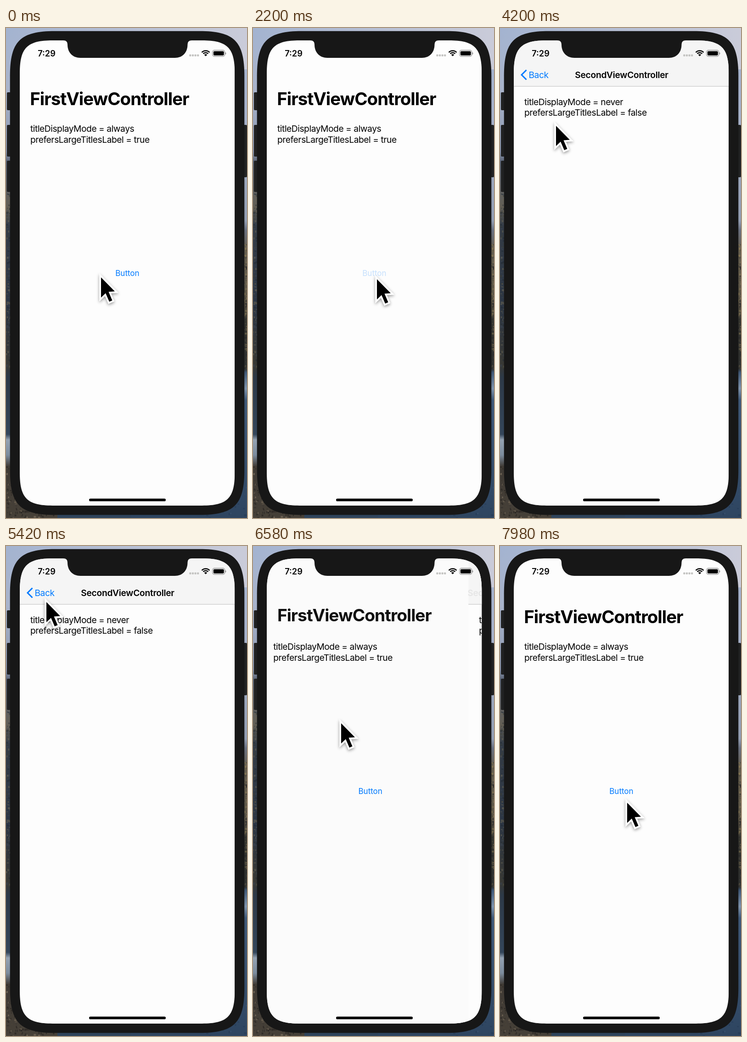
An HTML page with a canvas that plays this animation: 525 px wide and 1067 px high, repeating every 8000 ms.

```html
<!DOCTYPE html>
<html lang="en">
<head>
<meta charset="utf-8">
<title>Large title navigation</title>
<style>
html, body { margin: 0; width: 100%; height: 100%; overflow: hidden; background: #171717; }
canvas { display: block; width: 525px; height: 1067px; }
</style>
</head>
<body>
<canvas id="stage"></canvas>
<script>
const W = 525, H = 1067, LOOP = 8000;
const SCREEN = { x: 30, y: 27, w: 468.3, h: 1013, r: 51 };
const BAR_BOTTOM = 127;
const BLUE = '#007aff', BODY = '#171717';
const FAMILY = 'Inter, "Liberation Sans", sans-serif';
const PUSH = 2280, POP = 6260, SLIDE = 520;
const PRESS = 1500, RELEASE = 2240;

const dpr = window.devicePixelRatio || 1;
const canvas = document.getElementById('stage');
const ctx = canvas.getContext('2d');
canvas.width = W * dpr;
canvas.height = H * dpr;

const clamp = v => Math.max(0, Math.min(1, v));

function seeded(seed) {
  return () => {
    seed = (seed * 16807) % 2147483647;
    return seed / 2147483647;
  };
}

function roundRect(g, x, y, w, h, r, fill) {
  g.beginPath();
  g.roundRect(x, y, w, h, r);
  g.fillStyle = fill;
  g.fill();
}

// Rectangle whose corners ease into the straight sides
function smoothRect(g, x, y, w, h, r) {
  const e = 1.4 * r, c = 0.315 * r, x2 = x + w, y2 = y + h;
  g.beginPath();
  g.moveTo(x + e, y);
  g.lineTo(x2 - e, y);
  g.bezierCurveTo(x2 - c, y, x2, y + c, x2, y + e);
  g.lineTo(x2, y2 - e);
  g.bezierCurveTo(x2, y2 - c, x2 - c, y2, x2 - e, y2);
  g.lineTo(x + e, y2);
  g.bezierCurveTo(x + c, y2, x, y2 - c, x, y2 - e);
  g.lineTo(x, y + e);
  g.bezierCurveTo(x, y + c, x + c, y, x + e, y);
  g.closePath();
}

function shade(g, x, y, w, h, stops) {
  const grad = g.createLinearGradient(0, y, 0, y + h);
  for (const [at, color] of stops) grad.addColorStop((at - y) / h, color);
  g.fillStyle = grad;
  g.fillRect(x, y, w, h);
}

// Coast behind the device, and the device body itself
function makeBackdrop() {
  const layer = document.createElement('canvas');
  layer.width = W * dpr;
  layer.height = H * dpr;
  const g = layer.getContext('2d');
  g.scale(dpr, dpr);

  shade(g, 0, 0, 262, H, [[0, '#a3b3d0'], [130, '#a9b4cb'], [270, '#8c98b0'], [290, '#5c6577'],
    [390, '#625e54'], [430, '#343c46'], [600, '#2c3644'], [735, '#383834'], [760, '#2d3947'],
    [885, '#34465a'], [897, '#94a2b2'], [930, '#7c8c9d'], [955, '#3f3a34'], [H, '#464038']]);
  shade(g, 262, 0, 263, H, [[0, '#a3b3d0'], [200, '#a6b1c9'], [420, '#929db2'], [440, '#697080'],
    [480, '#665f50'], [600, '#5a5344'], [640, '#34342f'], [742, '#2e302f'], [750, '#3f5877'],
    [785, '#7e93ac'], [810, '#3e5878'], [H, '#2e4560']]);
  const haze = g.createLinearGradient(0, 0, W, 0);
  haze.addColorStop(0, 'rgba(206,206,218,0)');
  haze.addColorStop(1, 'rgba(206,206,218,0.9)');
  g.fillStyle = haze;
  g.fillRect(0, 0, W, 90);
  g.fillStyle = '#2f445b';
  g.fillRect(112, 1050, 160, 17);

  const rand = seeded(71);
  const grain = (n, x, y, w, h, colors) => {
    for (let i = 0; i < n; i++) {
      g.fillStyle = colors[Math.floor(rand() * colors.length)];
      g.fillRect(x + rand() * w, y + rand() * h, 1 + rand() * 4, 1 + rand() * 4);
    }
  };
  g.globalAlpha = 0.55;
  grain(180, 0, 360, 9, 380, ['#222a33', '#6a6452', '#3b4450', '#3e4038']);
  grain(420, 0, 955, 112, 112, ['#1f1d1b', '#8c7f6a', '#4a4238', '#2a2724']);
  grain(120, 518, 470, 7, 270, ['#28292a', '#8a7a55', '#4a463c']);
  grain(60, 400, 960, 125, 107, ['#243a54', '#3d5674']);
  g.globalAlpha = 1;

  for (const [x, y, w, h] of [[2, 140, 12, 39], [2, 211, 12, 69], [2, 289, 12, 68], [514, 211, 11, 114]])
    roundRect(g, x, y, w, h, 2, '#202122');
  smoothRect(g, 8.7, 6.7, 510.6, 1053.6, 70);
  g.fillStyle = BODY;
  g.fill();
  return layer;
}

function text(str, x, y, size, o = {}) {
  ctx.font = `${o.weight || 400} ${size}px ${FAMILY}`;
  ctx.letterSpacing = `${(o.track || 0) * size}px`;
  ctx.textAlign = o.align || 'left';
  ctx.fillStyle = o.color || '#000';
  ctx.fillText(str, x, y);
}

function faded(alpha, draw) {
  if (alpha <= 0) return;
  ctx.save();
  ctx.globalAlpha = alpha;
  draw();
  ctx.restore();
}

function shifted(dx, draw) {
  ctx.save();
  ctx.translate(dx, 0);
  draw();
  ctx.restore();
}

function page() {
  ctx.fillStyle = '#fdfdfd';
  ctx.fillRect(SCREEN.x, SCREEN.y, SCREEN.w, SCREEN.h);
}

function lines(y, mode, large) {
  text('titleDisplayMode = ' + mode, 53, y, 19.2, { track: -0.023 });
  text('prefersLargeTitlesLabel = ' + large, 53, y + 23.3, 19.2, { track: -0.023 });
}

function firstPage(buttonAlpha) {
  page();
  lines(226.3, 'always', true);
  faded(buttonAlpha, () => text('Button', 264.4, 540, 17, { color: BLUE, align: 'center' }));
}

function secondPage() {
  page();
  lines(167.5, 'never', false);
}

function barBack() {
  ctx.fillStyle = '#f5f5f5';
  ctx.fillRect(SCREEN.x, SCREEN.y, SCREEN.w, BAR_BOTTOM - SCREEN.y);
  ctx.fillStyle = '#bcbcbc';
  ctx.fillRect(SCREEN.x, BAR_BOTTOM - 0.5, SCREEN.w, 1);
}

function barTitle(dx, alpha) {
  faded(alpha, () => text('SecondViewController', 265 + dx, 108.7, 19.2,
    { weight: 600, track: -0.014, align: 'center' }));
}

function backButton(alpha) {
  faded(alpha, () => {
    ctx.strokeStyle = BLUE;
    ctx.lineWidth = 3;
    ctx.beginPath();
    ctx.moveTo(57.5, 91.5);
    ctx.lineTo(47, 102);
    ctx.lineTo(57.5, 112.5);
    ctx.stroke();
    text('Back', 62.4, 108.7, 19.2, { color: BLUE, track: -0.02 });
  });
}

// Grows out of the back label: p = 0 small in the bar, p = 1 in place
function largeTitle(p) {
  const q = 1 - p, scale = 1 - q * 0.5;
  faded(p, () => {
    ctx.translate(52.2 + 11 * q, 154 - 52 * q);
    ctx.scale(scale, scale);
    text('FirstViewController', 0, 14, 38.4, { weight: 700, track: -0.026 });
  });
}

function dim(amount) {
  ctx.fillStyle = `rgba(0,0,0,${amount})`;
  ctx.fillRect(SCREEN.x, SCREEN.y, SCREEN.w, SCREEN.h);
}

function statusBar() {
  text('7:29', 88.5, 61.6, 18.2, { weight: 600, align: 'center' });
  for (let i = 0; i < 4; i++) roundRect(ctx, 399.3 + i * 5.6, 57.6, 4.2, 4.2, 1, '#c2c2c0');

  const cx = 435, cy = 61.5, a = Math.PI / 4;
  ctx.strokeStyle = ctx.fillStyle = '#000';
  ctx.lineWidth = 2.5;
  for (const r of [12, 7.8]) {
    ctx.beginPath();
    ctx.arc(cx, cy, r, -Math.PI / 2 - a, -Math.PI / 2 + a);
    ctx.stroke();
  }
  ctx.beginPath();
  ctx.moveTo(cx, cy);
  ctx.arc(cx, cy, 4.6, -Math.PI / 2 - a, -Math.PI / 2 + a);
  ctx.fill();

  ctx.strokeStyle = '#8c8c8c';
  ctx.lineWidth = 1.2;
  ctx.beginPath();
  ctx.roundRect(449.8, 48.4, 27, 13.4, 4);
  ctx.stroke();
  roundRect(ctx, 451.9, 50.4, 22.8, 9.4, 2, '#000');
  roundRect(ctx, 477.8, 53, 1.6, 4.4, [0, 1.5, 1.5, 0], '#8c8c8c');
}

function notch() {
  ctx.fillStyle = BODY;
  ctx.beginPath();
  ctx.moveTo(125, 26);
  ctx.lineTo(125, 27);
  ctx.quadraticCurveTo(134, 27, 134, 36);
  ctx.bezierCurveTo(134, 54, 146, 65, 162, 65);
  ctx.lineTo(368, 65);
  ctx.bezierCurveTo(384, 65, 395.5, 54, 395.5, 36);
  ctx.quadraticCurveTo(395.5, 27, 404.5, 27);
  ctx.lineTo(404.5, 26);
  ctx.fill();
}

const arrow = new Path2D('M0 0V44L10 34.5L18 53L24.5 50.2L16.5 31.5L30 30.5Z');

function pointer(x, y) {
  ctx.save();
  ctx.translate(x, y);
  ctx.save();
  ctx.shadowColor = 'rgba(0,0,0,0.4)';
  ctx.shadowBlur = 6 * dpr;
  ctx.shadowOffsetY = 2.5 * dpr;
  ctx.strokeStyle = '#fff';
  ctx.lineWidth = 7.5;
  ctx.stroke(arrow);
  ctx.restore();
  ctx.fillStyle = '#000';
  ctx.fill(arrow);
  ctx.restore();
}

// time, x, y
const path = [
  [0, 207, 543], [500, 207, 543], [1350, 270, 547], [3450, 270, 547], [4200, 122, 213],
  [4700, 88, 122], [6150, 88, 122], [6580, 192, 386], [7300, 277, 559], [LOOP, 277, 559]
];

function along(t, c) {
  const slope = i => path[i] && path[i + 1]
    ? (path[i + 1][c] - path[i][c]) / (path[i + 1][0] - path[i][0]) : 0;
  const tangent = i => {
    const a = slope(i - 1), b = slope(i);
    return a * b > 0 ? 2 * a * b / (a + b) : 0;
  };
  let i = 0;
  while (i < path.length - 2 && t >= path[i + 1][0]) i++;
  const d = path[i + 1][0] - path[i][0], u = (t - path[i][0]) / d, v = 1 - u;
  return path[i][c] * (1 + 2 * u) * v * v + path[i + 1][c] * u * u * (3 - 2 * u)
    + d * u * v * (tangent(i) * v - tangent(i + 1) * u);
}

function slide(t, start) {
  const k = Math.max(0, t - start) * 0.014;
  return 1 - (1 + k) * Math.exp(-k);
}

function buttonAlpha(t) {
  if (t < PRESS || t > RELEASE + 250) return 1;
  return 0.22 + 0.78 * clamp((t - RELEASE) / 250);
}

function pushing(t) {
  const p = slide(t, PUSH), q = clamp(p * 1.02);
  shifted(-0.3 * SCREEN.w * p, () => firstPage(buttonAlpha(t)));
  dim(0.13 * p);
  shifted(SCREEN.w * (1 - p), secondPage);
  faded(q, barBack);
  barTitle(324 * (1 - q), q);
  backButton(q);
  largeTitle(1);
}

function popping(t) {
  const p = slide(t, POP);
  page();
  shifted(-0.3 * SCREEN.w * (1 - p), () => firstPage(1));
  dim(0.13 * (1 - p));
  shifted(SCREEN.w * p, () => { secondPage(); barBack(); });
  barTitle(324 * p, 1 - p);
  backButton(1 - 2 * p);
  largeTitle(p);
}

function content(t) {
  if (t >= PUSH && t < PUSH + SLIDE) pushing(t);
  else if (t >= POP && t < POP + SLIDE) popping(t);
  else if (t >= PUSH && t < POP) {
    secondPage();
    barBack();
    barTitle(0, 1);
    backButton(1);
  } else {
    firstPage(buttonAlpha(t));
    largeTitle(1);
  }
}

function recorded(t) {
  const into = t % 140;
  const step = into < 100 ? 0 : into < 120 ? 1 : 2;
  return t - into + step * 140 / 3;
}

const backdrop = makeBackdrop();

function render(t) {
  ctx.setTransform(dpr, 0, 0, dpr, 0, 0);
  ctx.drawImage(backdrop, 0, 0, W, H);
  ctx.save();
  smoothRect(ctx, SCREEN.x, SCREEN.y, SCREEN.w, SCREEN.h, SCREEN.r);
  ctx.clip();
  content(t);
  statusBar();
  roundRect(ctx, 181, 1024.8, 167, 5.7, 2.85, '#000');
  ctx.restore();
  notch();
  pointer(along(t, 1), along(t, 2));
}

const began = performance.now();
function tick() {
  render(recorded((performance.now() - began) % LOOP));
  requestAnimationFrame(tick);
}
tick();
</script>
</body>
</html>
```
